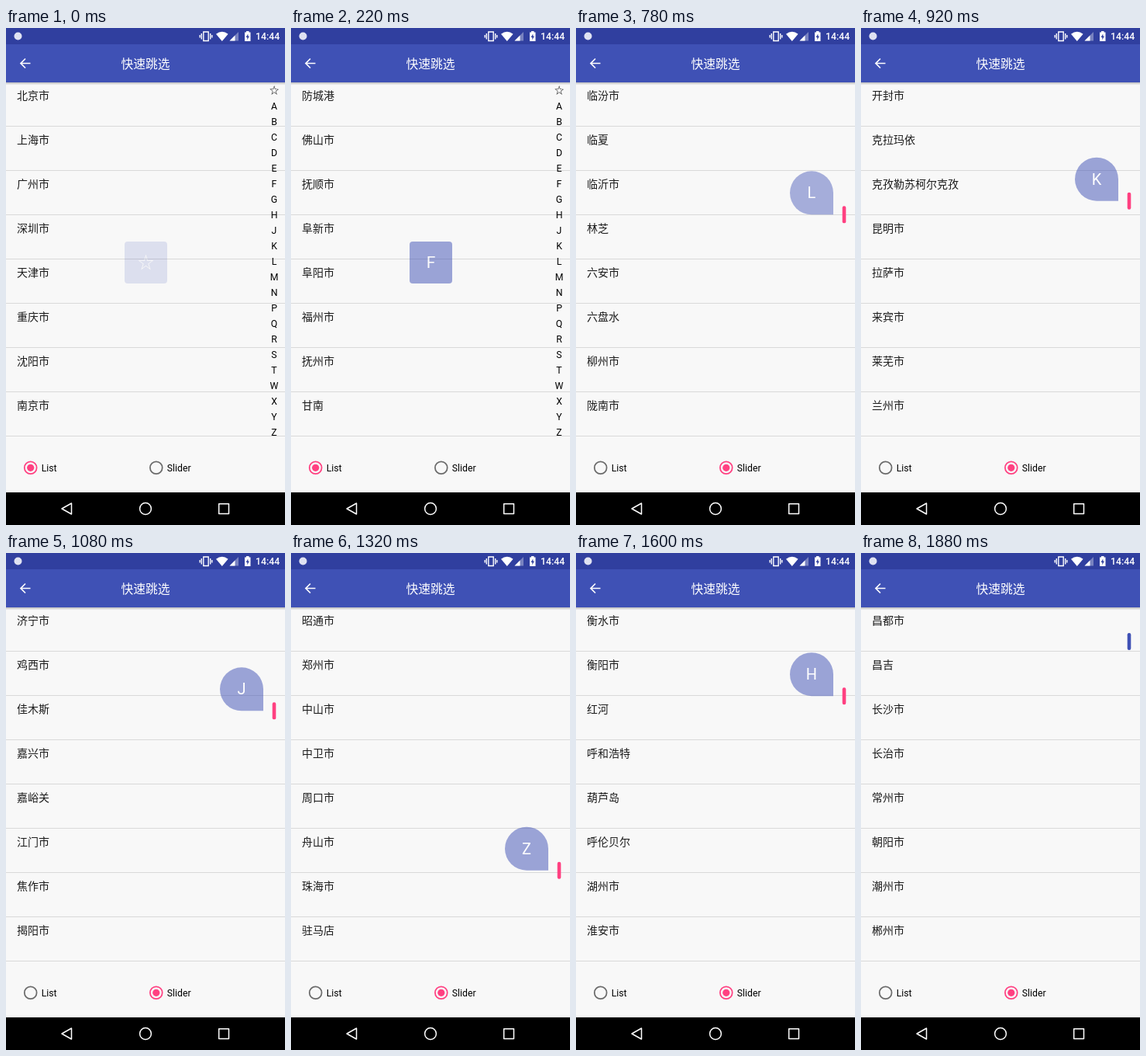
An HTML page for the animation above (1.9 s loop, 360x640 px).

```html
<!DOCTYPE html>
<html lang="zh-CN">
<head>
<meta charset="utf-8">
<style>
html, body { margin: 0; width: 100%; height: 100%; overflow: hidden; background: #f8f8f8; }
svg { display: block; width: 360px; height: 640px; }
text { font-family: Roboto, "Noto Sans CJK SC", "Noto Sans CJK", sans-serif; }
.city { font: 14px "Noto Sans CJK SC", "Noto Sans CJK", sans-serif; fill: #1c1c1c; }
.small { font-size: 12.25px; fill: #000; }
.mid { text-anchor: middle; }
</style>
</head>
<body>
<svg viewBox="0 0 360 640">
  <defs>
    <linearGradient id="shade" x2="0" y2="1">
      <stop stop-color="#000" stop-opacity=".24"/>
      <stop offset="1" stop-color="#000" stop-opacity="0"/>
    </linearGradient>
  </defs>
  <rect width="360" height="640" fill="#f8f8f8"/>
  <g id="rows"></g>
  <g id="index"></g>
  <g id="box" fill="#3f51b5">
    <rect x="153" y="275" width="55" height="54" rx="4"/>
    <text id="boxLetter" class="mid" x="180.5" y="309" font-size="21" fill="#fff"></text>
  </g>
  <g id="bubble">
    <path d="M0 0H-28A28 28 0 1 1 0 -28Z" fill="#3f51b5" fill-opacity=".5"/>
    <text id="bubbleLetter" class="mid" x="-28" y="-21" font-size="20" fill="#fff"></text>
  </g>
  <rect id="handle" x="343.7" width="4.6" height="22" rx="2.2"/>

  <rect y="70" width="360" height="3.5" fill="url(#shade)"/>
  <rect width="360" height="70" fill="#3f51b5"/>
  <rect width="360" height="21" fill="#303f9f"/>
  <text class="mid" x="180" y="52" font-size="15.75" fill="#fff">快速跳选</text>
  <path d="M31.5 45.5H19M25 39.5L19 45.5L25 51.5" fill="none" stroke="#fff" stroke-width="1.7"/>

  <g fill="#fff">
    <circle cx="15.5" cy="10.5" r="5" fill="#dfe2f2"/>
    <path d="M271 7.8Q278.8 1.8 286.6 7.8L278.8 17Z"/>
    <path d="M300 5V16.5H288.5Z" opacity=".35"/>
    <path d="M295.5 9.5V16.5H288.5Z"/>
    <path fill-rule="evenodd" d="M308 5.5H310V4H313.5V5.5H315.5V17H308ZM312.3 7.5L309.6 12H311.3V15.2L314 10.6H312.3Z"/>
    <text x="322" y="15.3" font-size="12.25" font-weight="500">14:44</text>
  </g>
  <path d="M254.8 5H261.2V16.5H254.8ZM252.3 7V14.5M263.7 7V14.5M250.2 9V12.6M265.8 9V12.6" fill="none" stroke="#fff" stroke-width="1.4"/>

  <g id="radios"></g>
  <rect y="598" width="360" height="42"/>
  <g fill="none" stroke="#fff" stroke-width="1.5" stroke-linejoin="round">
    <path d="M84.5 612V626L72 619Z"/>
    <circle cx="180" cy="619" r="7.4"/>
    <rect x="274.7" y="612.7" width="12.8" height="12.8"/>
  </g>
</svg>
<script>
const LOOP = 1900, PINK = "#ff4081", BLUE = "#3f51b5", GREY = "#6b6b6b";
const $ = id => document.getElementById(id);

// Two-character names take the suffix 市 unless they end with a dot.
const SECTIONS = `☆ 北京 上海 广州 深圳 天津 重庆 沈阳 南京
A 阿坝. 阿克苏 阿拉善 阿勒泰 阿里. 安康 安庆 鞍山 安顺 安阳
B 白城 百色 白山 白银 蚌埠 保定 宝鸡 保山 包头 巴中 北海 北京 本溪 毕节 滨州 亳州
C 沧州 昌都 昌吉. 长沙 长治 常州 朝阳 潮州 郴州 成都 承德 赤峰 池州 崇左 楚雄. 滁州
D 大理. 大连 丹东 大庆 大同 达州 德宏. 德阳 德州 定西 迪庆. 东莞 东营
E 鄂尔多斯 恩施. 鄂州
F 防城港 佛山 抚顺 阜新 阜阳 福州 抚州
G 甘南. 赣州 甘孜. 广安 广元 广州 贵港 桂林 贵阳 果洛. 固原
H 哈尔滨 海北. 海东 海口 海南. 海西. 哈密 邯郸 杭州 汉中 鹤壁 河池 合肥 鹤岗 黑河 衡水 衡阳 红河. 呼和浩特 葫芦岛 呼伦贝尔 湖州 淮安 淮北 怀化 淮南 黄冈 黄南. 黄山 黄石 惠州
J 吉安 吉林 济南 济宁 鸡西 佳木斯 嘉兴 嘉峪关 江门 焦作 揭阳 金昌 晋城 景德镇 荆门 荆州 金华 晋中 锦州 九江 酒泉
K 喀什. 开封 克拉玛依 克孜勒苏柯尔克孜 昆明
L 拉萨 来宾 莱芜 兰州 廊坊 乐山 凉山. 连云港 聊城 辽阳 辽源 丽江 临沧 临汾 临夏. 临沂 林芝. 六安 六盘水 柳州 陇南 龙岩 娄底 漯河 洛阳 泸州 吕梁
M 马鞍山 茂名 眉山 梅州 绵阳 牡丹江
N 南昌 南充 南京 南宁 南平 南通 南阳 那曲. 内江 宁波 宁德 怒江.
P 盘锦 攀枝花 平顶山 平凉 萍乡 莆田 濮阳
Q 黔东南 黔南. 黔西南 青岛 庆阳 清远 秦皇岛 钦州 齐齐哈尔 七台河 泉州 曲靖 衢州
R 日喀则 日照
S 三门峡 三明 三亚 上海 商洛 商丘 上饶 汕头 汕尾 韶关 绍兴 邵阳 沈阳 深圳 石家庄 十堰 石嘴山 双鸭山 朔州 四平 松原 绥化 遂宁 随州 宿迁 苏州 宿州
T 塔城. 泰安 太原 台州 泰州 唐山 天津 天水 铁岭 铜川 通化 通辽 铜陵 铜仁
W 潍坊 威海 渭南 文山. 温州 乌海 武汉 芜湖 乌鲁木齐 武威 无锡 吴忠 梧州
X 厦门 西安 湘潭 湘西. 襄阳 咸宁 咸阳 孝感 锡林郭勒 邢台 西宁 新乡 信阳 新余 忻州 徐州 许昌 宣城
Y 雅安 延安 延边. 盐城 阳江 阳泉 扬州 烟台 宜宾 宜昌 伊春 宜春 伊犁. 银川 营口 鹰潭 益阳 永州 岳阳 玉林 运城 云浮 玉溪 玉树.
Z 枣庄 张家界 张家口 张掖 漳州 湛江 肇庆 昭通 郑州 中山 中卫 周口 舟山 珠海 驻马店 株州 淄博 自贡 资阳 遵义`;

const cities = [], starts = [], letters = [];
for (const line of SECTIONS.split("\n")) {
  const [letter, ...names] = line.split(" ");
  letters.push(letter);
  starts.push(cities.length);
  for (const n of names) {
    const name = n.endsWith(".") ? n.slice(0, -1) : n.length === 2 ? n + "市" : n;
    cities.push({ name, letter });
  }
}

function add(parent, tag, attrs, label = "") {
  const node = document.createElementNS("http://www.w3.org/2000/svg", tag);
  set(node, attrs);
  node.textContent = label;
  return $(parent).appendChild(node);
}
function set(node, attrs) {
  for (const key in attrs) node.setAttribute(key, attrs[key]);
}
function label(node, value) {
  if (node.textContent !== value) node.textContent = value;
}
const ramp = (t, from, to) => Math.min(1, Math.max(0, (t - from) / (to - from)));

const rows = Array.from({ length: 8 }, (_, i) => {
  add("rows", "rect", { y: 126 + 57 * i, width: 360, height: 1, fill: "#d9d9d9" });
  return add("rows", "text", { class: "city", x: 14, y: 92 + 57 * i });
});
letters.forEach((c, i) => add("index", "text", { class: "small mid", x: 346, y: 84.5 + 20 * i }, c));
const radios = [["List", 31.7], ["Slider", 193.8]].map(([name, cx]) => {
  add("radios", "text", { class: "small", x: cx + 14, y: 571 }, name);
  return {
    ring: add("radios", "circle", { cx, cy: 566.3, r: 7.9, fill: "none", "stroke-width": 1.75 }),
    dot: add("radios", "circle", { cx, cy: 566.3 })
  };
});
function drawRadio({ ring, dot }, color, size) {
  set(ring, { stroke: color });
  set(dot, { fill: color, r: 4.6 * size });
}

const SWITCH = 480, TOUCH = 640, RELEASE = 1830;
// time, handle centre, first visible city
const drag = [
  [TOUCH, 271, "南通市"], [780, 240.5, "临汾市"], [1080, 202.5, "济南市"],
  [1320, 409.5, "郑州市"], [1600, 184.5, "衡水市"], [RELEASE, 114, "昌都市"]
].map(([t, y, name]) => ({ t, y, row: cities.findIndex((c, i) => i > 7 && c.name === name) }));

function dragAt(t) {
  const k = Math.max(1, drag.findIndex(d => d.t >= t));
  const end = t >= RELEASE ? drag.length - 1 : k;
  const a = drag[end - 1], b = drag[end], p = ramp(t, a.t, b.t);
  return { y: a.y + (b.y - a.y) * p, row: Math.round(a.row + (b.row - a.row) * p) };
}

function draw(t) {
  const section = Math.round(10 * ramp(t, 20, 350));
  const { y, row } = dragAt(t);
  const first = t < TOUCH ? starts[section] : row;
  rows.forEach((node, i) => label(node, cities[first + i] ? cities[first + i].name : ""));

  const slider = t >= SWITCH;
  set($("index"), { visibility: slider ? "hidden" : "visible" });
  set($("box"), { opacity: 0.5 * (0.28 + 0.72 * ramp(t, 0, 60)) * (1 - ramp(t, 370, 460)) });
  label($("boxLetter"), letters[section]);

  const held = t >= TOUCH && t < RELEASE;
  set($("handle"), { y: y - 11, visibility: slider ? "visible" : "hidden", fill: held ? PINK : BLUE });
  set($("bubble"), {
    transform: `translate(332 ${y})`,
    opacity: ramp(t, TOUCH, 800) * (1 - ramp(t, RELEASE, 1875))
  });
  label($("bubbleLetter"), cities[row].letter);

  drawRadio(radios[0], slider ? GREY : PINK, 1 - ramp(t, 500, 560));
  drawRadio(radios[1], slider ? (t < 520 ? "#dc4880" : PINK) : GREY, ramp(t, 510, 590));
}

const begin = performance.now();
function frame() {
  draw((performance.now() - begin) % LOOP);
  requestAnimationFrame(frame);
}
frame();
</script>
</body>
</html>
```
